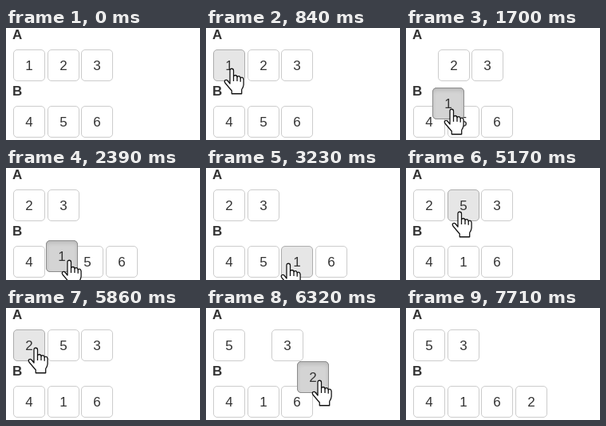
Recreate the animation shown at these times as an HTML page with a canvas. Size 243 by 141 pixels, loop 8.72 s.

```html
<!DOCTYPE html>
<html lang="en">
<head>
<meta charset="utf-8">
<title>Sortable lists</title>
<style>
  html, body { margin: 0; width: 100%; height: 100%; overflow: hidden; background: #fff; }
  canvas { display: block; width: 243px; height: 141px; }
</style>
</head>
<body>
<canvas id="stage"></canvas>
<script>
const WIDTH = 243, HEIGHT = 141, LOOP = 8720;
const SIZE = 40, LEFT = 9, PITCH = 42.6, GAP = 30.7;
const ROWS = [27, 98];
const FONT = '17px "Liberation Sans", Arial, sans-serif';

const canvas = document.getElementById('stage');
const scale = window.devicePixelRatio || 1;
canvas.width = WIDTH * scale;
canvas.height = HEIGHT * scale;
const ctx = canvas.getContext('2d');

const stepAt = ms => Math.floor((ms + 14) / 77.1);

// Order of both lists; "_" is the narrow, invisible placeholder.
const orders = [
  [0, '123', '456'], [15, '_23', '456'], [23, '23', '4_56'], [34, '23', '45_6'],
  [39, '23', '4516'], [51, '23', '4_16'], [57, '2_3', '416'], [67, '253', '416'],
  [79, '_53', '416'], [80, '5_3', '416'], [84, '53', '416_'], [95, '53', '4162']
];

// grab: where inside the tile the pointer holds it
const drags = [
  { digit: '1', press: 14, start: 15, drop: 39, grab: [22, 24] },
  { digit: '5', press: 49, start: 51, drop: 67, grab: [28, 22] },
  { digit: '2', press: 78, start: 79, drop: 95, grab: [27, 23] }
];

// Pointer path: step, x, y
const path = [
  [3, 129, 132], [7, 60, 79], [11, 31, 51], [14, 31, 51], [21, 55, 99], [22, 56, 102],
  [24, 59, 112], [25, 59, 114], [28, 59, 114], [36, 109, 119], [38, 109, 119],
  [42, 102, 120], [45, 80, 120], [50, 80, 120], [54, 70, 77], [55, 70, 76],
  [62, 66, 55], [68, 66, 55], [76, 36, 50], [77, 36, 50], [81, 141, 90],
  [82, 141, 91], [88, 162, 120], [89, 165, 123], [96, 165, 123], [100, 166, 145]
];

function pointerAt(step) {
  const next = path.findIndex(key => key[0] >= step);
  if (next < 1) return path[next < 0 ? path.length - 1 : 0].slice(1);
  const [s0, x0, y0] = path[next - 1], [s1, x1, y1] = path[next];
  const k = (step - s0) / (s1 - s0);
  return [Math.round(x0 + (x1 - x0) * k), Math.round(y0 + (y1 - y0) * k)];
}

const styles = {
  normal: ['#fff', '#ccc'],
  hover: ['#e6e6e6', '#adadad'],
  active: ['#d4d4d4', '#8c8c8c']
};

function drawTile(digit, x, y, state) {
  const [fill, border] = styles[state];
  const shape = new Path2D();
  shape.roundRect(x + 0.5, y + 0.5, SIZE - 1, SIZE - 1, 4.5);
  ctx.fillStyle = fill;
  ctx.fill(shape);
  if (state === 'active') drawInsetShadow(shape, x, y);
  ctx.strokeStyle = border;
  ctx.lineWidth = 1;
  ctx.stroke(shape);
  ctx.font = FONT;
  ctx.textAlign = 'center';
  ctx.fillStyle = '#333';
  ctx.fillText(digit, x + SIZE / 2, y + 26);
}

function drawInsetShadow(shape, x, y) {
  const frame = new Path2D(shape);
  frame.rect(x - 20, y - 20, SIZE + 40, SIZE + 40);
  ctx.save();
  ctx.clip(shape);
  ctx.shadowColor = 'rgba(0,0,0,.125)';
  ctx.shadowBlur = 5 * scale;
  ctx.shadowOffsetY = 3 * scale;
  ctx.fillStyle = '#000';
  ctx.fill(frame, 'evenodd');
  ctx.restore();
}

const hand = new Path2D(
  'M5 13V2Q5 .5 6.5 .5T8 2V7Q8.2 6 9.5 6T11 7.5Q11.3 6.8 12.4 6.8T13.8 8.5' +
  'Q14 7.8 15 7.8T16.4 9.5V14Q16.2 16 14.8 18V21.5H6.5V19L1 12.5Q0 11 1 10.2T3 10.5Z');
const knuckles = new Path2D('M8 7V11M11 7.5V11M13.8 8.5V11.5');

function drawHand(x, y) {
  ctx.save();
  ctx.translate(x - 8.5, y - 0.5);
  ctx.scale(1.5, 1.5);
  ctx.lineWidth = 0.85;
  ctx.lineJoin = 'round';
  ctx.fillStyle = '#fff';
  ctx.strokeStyle = '#111';
  ctx.fill(hand);
  ctx.stroke(hand);
  ctx.stroke(knuckles);
  ctx.restore();
}

function drawLabel(text, y) {
  ctx.font = 'bold ' + FONT;
  ctx.textAlign = 'left';
  ctx.fillStyle = '#333';
  ctx.fillText(text, 8, y);
}

function draw(step) {
  ctx.setTransform(scale, 0, 0, scale, 0, 0);
  ctx.fillStyle = '#fff';
  ctx.fillRect(0, 0, WIDTH, HEIGHT);
  drawLabel('A', 14);
  drawLabel('B', 85);

  const visible = step >= 3 && step < 100;
  const [px, py] = pointerAt(step);
  const drag = drags.find(d => step >= d.press && step < d.drop);
  const lists = orders.findLast(order => order[0] <= step).slice(1);

  lists.forEach((list, row) => {
    let left = LEFT;
    for (const digit of list) {
      const x = Math.round(left), y = ROWS[row];
      left += digit === '_' ? GAP : PITCH;
      if (digit === '_') continue;
      const inside = px >= x && px < x + SIZE && py >= y && py < y + SIZE;
      const state = drag ? (drag.digit === digit ? 'active' : 'normal')
                         : visible && inside ? 'hover' : 'normal';
      drawTile(digit, x, y, state);
    }
  });

  if (drag && step >= drag.start) {
    // The held tile trails the pointer by one step.
    const [x, y] = pointerAt(step - 1);
    drawTile(drag.digit, x - drag.grab[0], y - drag.grab[1], 'active');
  }
  if (visible) drawHand(px, py);
}

const begin = performance.now();
function tick() {
  draw(stepAt((performance.now() - begin) % LOOP));
  requestAnimationFrame(tick);
}
tick();
</script>
</body>
</html>
```
